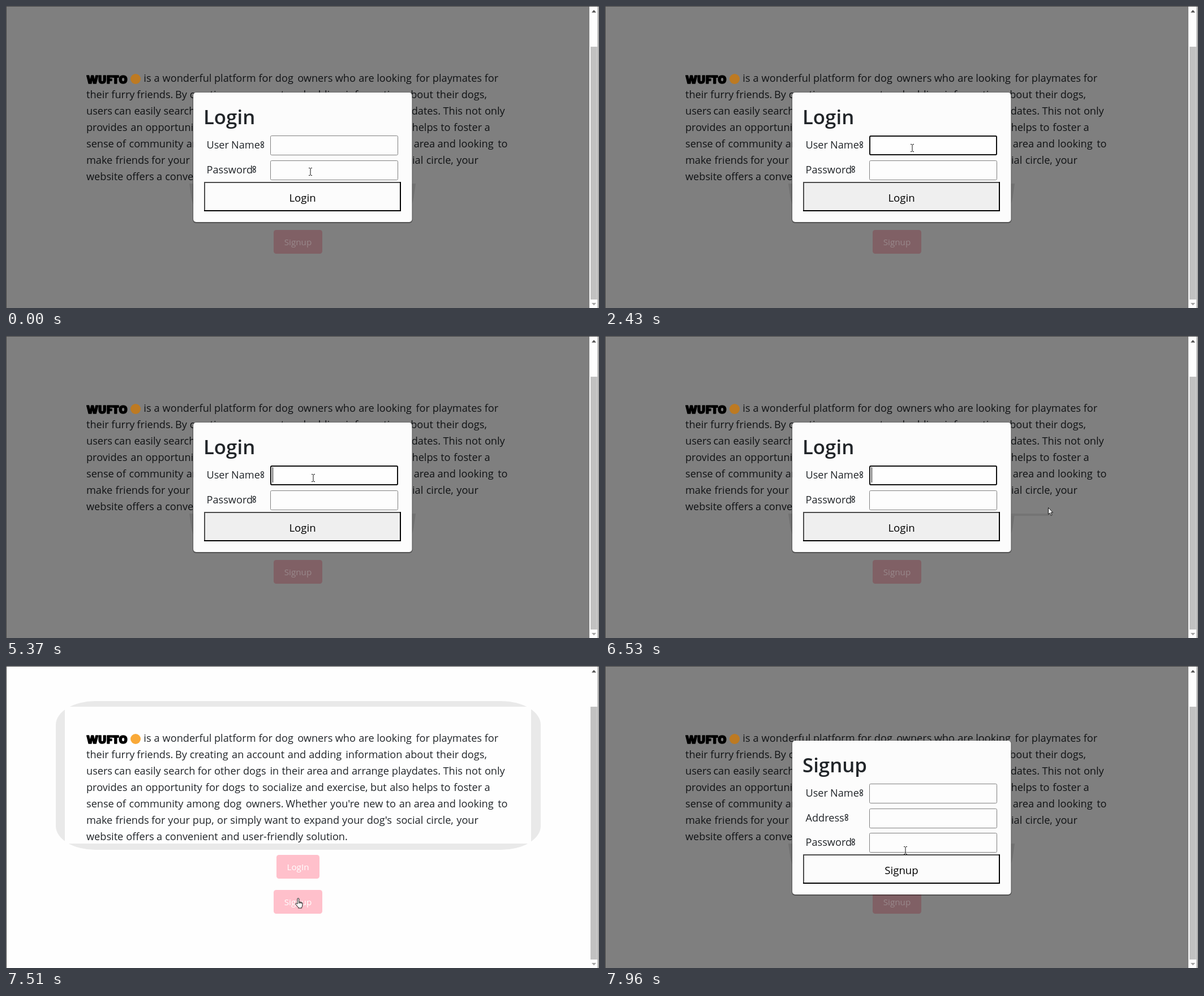
Animation of 1048 by 534 pixels, one loop 8000 ms. Source, as an HTML page:

```html
<!DOCTYPE html>
<html lang="en">
<head>
<meta charset="utf-8">
<title>Login and signup dialogs</title>
<style>
  html, body { margin: 0; width: 100%; height: 100%; overflow: hidden; background: #fefefe; }
  svg { display: block; width: 1048px; height: 534px; font-family: "Open Sans", "Noto Sans", sans-serif; }
  .copy { font-size: 18.15px; fill: #212529; }
  .mark { font-size: 19.5px; font-weight: 800; stroke: #000; stroke-width: 1.6px; stroke-linejoin: round; }
  .head { font-size: 34.8px; font-weight: 600; fill: #212529; }
  .mid { text-anchor: middle; }
  .pill { font-size: 15.2px; fill: #fff; }
  .send { font-size: 18.6px; fill: #000; }
</style>
</head>
<body>
<svg id="stage" viewBox="0 0 1048 534" xmlns="http://www.w3.org/2000/svg"></svg>
<script>
const NS = 'http://www.w3.org/2000/svg';
const LOOP = 8000;
const stage = document.getElementById('stage');

function add(parent, tag, attrs = {}, text) {
  const el = document.createElementNS(NS, tag);
  for (const key in attrs) el.setAttribute(key, attrs[key]);
  if (text !== undefined) el.textContent = text;
  parent.appendChild(el);
  return el;
}
const group = parent => add(parent, 'g');
const rect = (parent, x, y, width, height, fill, more) =>
  add(parent, 'rect', { x, y, width, height, fill, ...more });
const show = (el, on) => el.setAttribute('visibility', on ? 'visible' : 'hidden');

// Word spacing follows humanist UI letter advances, in 1/2048 em.
const letters = "abcdefghijklmnopqrstuvwxyz .,'-ABNPTUW";
const advances = [1042, 1204, 946, 1206, 1072, 641, 1206, 1158, 496, 496, 1018, 496, 1764,
  1158, 1200, 1204, 1206, 711, 869, 694, 1158, 981, 1479, 940, 991, 926,
  561, 444, 444, 470, 819, 1321, 1174, 1532, 1147, 1073, 1407, 1909];
const UNIT = 19.33 / 2048;
const measure = s => [...s].reduce((sum, c) => sum + advances[letters.indexOf(c)], 0) * UNIT;

// Sets a line word by word and returns its end.
function line(parent, x, y, s) {
  const el = add(parent, 'text', { y, class: 'copy' });
  for (const word of s.split(' ')) {
    add(el, 'tspan', { x: x.toFixed(2) }, word + ' ');
    x += measure(word + ' ');
  }
  return x - measure(' ');
}

function pill(parent, x, y, width, label, fill = '#ffc0cb', ink = '#fff') {
  rect(parent, x, y, width, 42, fill, { rx: 4.5 });
  add(parent, 'text', { x: x + width / 2, y: y + 27, class: 'pill mid', style: `fill:${ink}` }, label);
}

// Page
rect(stage, 0, 0, 1048, 534, '#fefefe');
const page = rect(stage, 0, 0, 1031, 534, '#7f7f7f');

const frame = group(stage);
rect(frame, 88, 62, 857, 263, '#e9e9e9', { rx: 70, ry: 42 });
rect(frame, 104, 72, 824, 242, '#fefefe');

const copy = group(stage);
add(copy, 'text', { x: 142.5, y: 136.5, class: 'mark' }, 'WUFTO');
const dot = add(copy, 'circle', { cx: 229, cy: 129, r: 9 });
line(copy, 243.3, 134, 'is a wonderful platform for dog owners who are looking for playmates for');
[
  'their furry friends. By creating an account and adding information about their dogs,',
  'users can easily search for other dogs in their area and arrange playdates. This not only',
  'provides an opportunity for dogs to socialize and exercise, but also helps to foster a',
  "sense of community among dog owners. Whether you're new to an area and looking to",
  "make friends for your pup, or simply want to expand your dog's social circle, your",
  'website offers a convenient and user-friendly solution.'
].forEach((s, i) => line(copy, 142, 163 + i * 28.95, s));

const bright = group(stage);
pill(bright, 478, 334, 76, 'LogIn');
pill(bright, 473, 396, 86, 'Signup');

const dim = group(stage);
pill(dim, 473, 396, 86, 'Signup', '#806065', '#98888b');
add(dim, 'path', { d: 'M324 314H332V354L328 342ZM724 314H716V354L720 342Z', fill: '#717171' });
const streak = rect(dim, 718, 314, 67, 4, '#747474');

// Dialogs
function field(parent, y) {
  rect(parent, 467.5, y + .5, 225, 34, '#fdfdfd', { rx: 2, stroke: '#808080', 'stroke-width': 1 });
}

function dialog(title, top, height, labels) {
  const g = group(stage);
  rect(g, 330, top - .5, 388.5, height + 2.5, '#000', { rx: 6, opacity: .35 });
  rect(g, 331, top, 386.5, height, '#fcfcfc', { rx: 5 });
  add(g, 'text', { x: 349, y: top + 55.5, class: 'head' }, title);
  labels.forEach((label, i) => {
    const y = top + 99 + i * 43.5;
    const x = line(g, 354.5, y, label) + 3.8;
    for (const rise of [10, 4])
      add(g, 'circle', { cx: x, cy: y - rise + .2, r: 2.4, fill: 'none', stroke: '#212529', 'stroke-width': 1.2 });
    field(g, Math.round(top + 76 + i * 43.5));
  });
  const y = top + height - 71;
  const face = rect(g, 350, y, 348, 52, '#fcfcfc');
  add(g, 'path', { d: `M351 ${y + 52}V${y + 1}H698`, fill: 'none', stroke: '#4c4c4c', 'stroke-width': 2 });
  add(g, 'path', { d: `M350 ${y + 51}H697V${y}`, fill: 'none', stroke: '#000', 'stroke-width': 2 });
  add(g, 'text', { x: 524, y: y + 34.5, class: 'send mid' }, title);
  return { g, face };
}

const login = dialog('Login', 153, 229, ['User Name', 'Password']);
const signup = dialog('Signup', 132, 272, ['User Name', 'Address', 'Password']);
const ring = rect(login.g, 468, 230, 224, 33, '#fefefe', { rx: 2, stroke: '#101010', 'stroke-width': 2 });
const caret = rect(login.g, 471, 232, 1, 27, '#000');

// Scrollbar and window edges
rect(stage, 1031, 0, 17, 534, '#fefefe');
rect(stage, 1033, 72, 12, 447, '#c1c1c1');
add(stage, 'path', { d: 'M1035 11.5L1039 7 1043 11.5Z', fill: '#505050' });
add(stage, 'path', { d: 'M1035 525L1039 529.5 1043 525Z', fill: '#a3a3a3' });
rect(stage, 0, 0, 1048, 1, '#444');
rect(stage, 0, 0, 1, 534, '#444');
rect(stage, 1046, 0, 1, 534, '#444');

// Pointers
const outline = { fill: '#fff', stroke: '#111', 'stroke-width': 1, 'stroke-linejoin': 'round' };
const pointers = {
  beam: add(stage, 'path', {
    d: 'M-3-6.5H-1L0-5.5 1-6.5H3M0-5.5V5.5M-3 6.5H-1L0 5.5 1 6.5H3',
    fill: 'none', stroke: '#111', 'stroke-width': 1
  }),
  arrow: add(stage, 'path', { d: 'M.5.5V12.3L3.1 9.8 5 14.3 6.9 13.5 5 9.1H8.5Z', ...outline }),
  hand: add(stage, 'path', {
    d: 'M4 11V2A1.4 1.4 0 0 1 6.8 2V7L11 7.9Q12.9 8.3 12.9 10.2V13Q12.9 15 11.7 16.5V18H5.5V16.5'
      + 'L1 11.5Q.2 10 1.6 9.6 2.6 9.4 4 11ZM6.8 7V10M8.9 7.5V10M11 7.9V10.4',
    ...outline
  })
};

const moves = [
  [0, 'beam', 538, 293], [150, 'beam', 540, 270], [270, 'beam', 542, 254.5],
  [420, 'beam', 542, 251], [850, 'beam', 543, 251],
  [6260, 'arrow', 622, 262], [6380, 'arrow', 710, 283], [6530, 'arrow', 783, 303],
  [6680, 'arrow', 792, 306], [6970, 'arrow', 737, 317], [7090, 'arrow', 634, 350],
  [7210, 'arrow', 556, 381], [7360, 'hand', 517, 407], [7510, 'hand', 511, 410],
  [7660, 'arrow', 515, 410], [7960, 'beam', 531, 326]
];
const blinks = [1110, 1820, 2430, 2970, 3530, 4210, 4770, 5370, 5960, 6530];

function draw(t) {
  const inLogin = t < 6680;
  const inSignup = t >= 7660;
  const open = inLogin || inSignup;
  const focused = inLogin && t >= 270;

  show(page, open);
  show(frame, !open);
  show(bright, !open);
  show(dim, open);
  show(streak, t >= 6530 && inLogin);
  copy.querySelectorAll('.copy').forEach(el => { el.style.fill = open ? '#101214' : '#212529'; });
  dot.setAttribute('fill', open ? '#bd7a22' : '#f9a938');

  show(login.g, inLogin);
  show(signup.g, inSignup);
  show(ring, focused);
  show(caret, focused && blinks.filter(b => b <= t).length % 2 === 0);
  login.face.setAttribute('fill', t >= 570 ? '#efefef' : '#fcfcfc');

  const [, kind, x, y] = moves.filter(m => m[0] <= t).pop();
  for (const name in pointers) show(pointers[name], name === kind);
  pointers[kind].setAttribute('transform', `translate(${x} ${y})`);
}

const start = performance.now();
function tick() {
  draw((performance.now() - start) % LOOP);
  requestAnimationFrame(tick);
}
tick();
</script>
</body>
</html>
```
